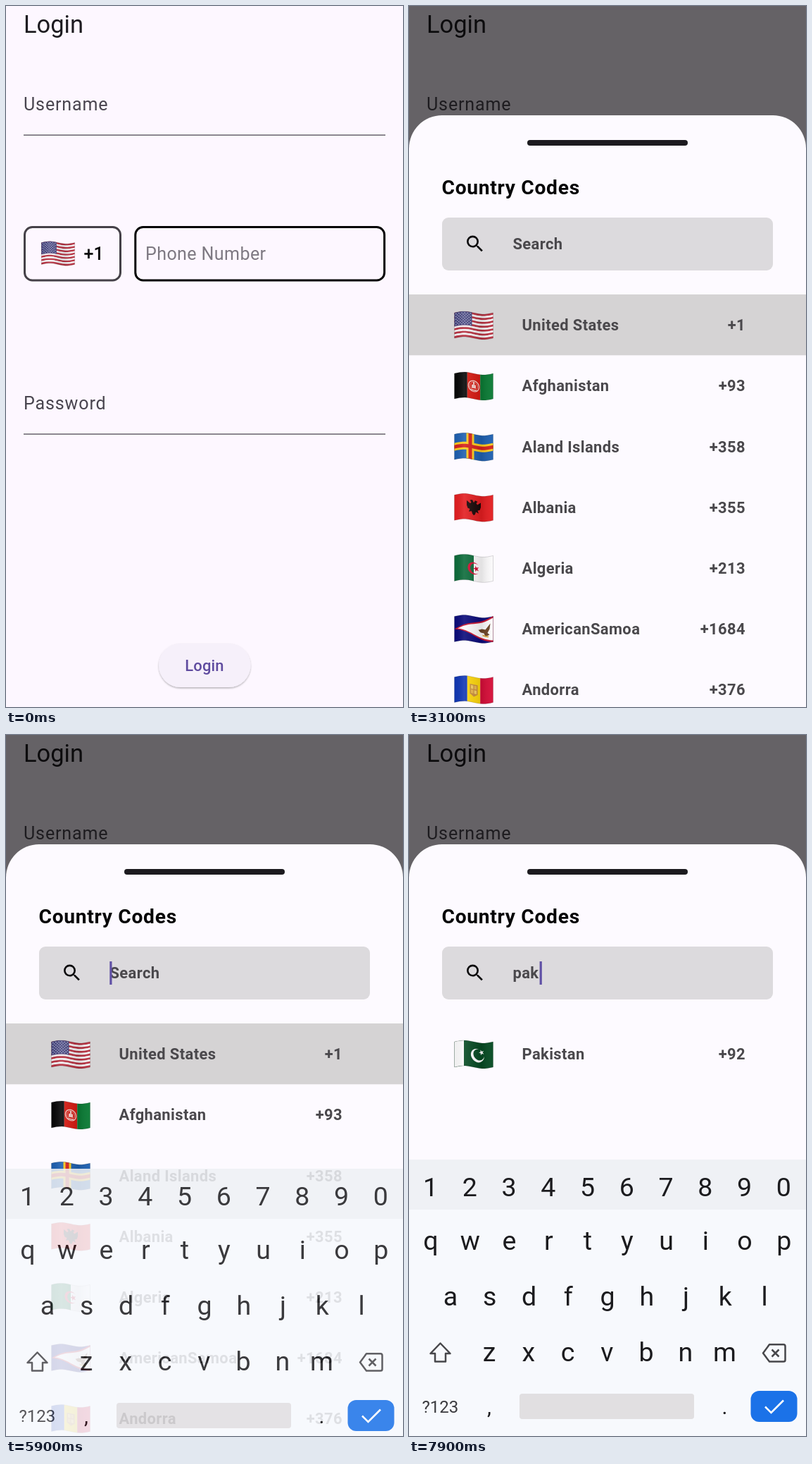
These frames come from a looping animation (564 px wide and 994 px high, 8 s). An HTML page:

```html
<!DOCTYPE html>
<html lang="en">
<head>
<meta charset="utf-8">
<title>Country code picker</title>
<style>
html, body { margin: 0; width: 100%; height: 100%; overflow: hidden; background: #fdf7ff; }
svg { display: block; width: 564px; height: 994px; }
text { font-family: Roboto, sans-serif; white-space: pre; }
.item { font-size: 21.93px; font-weight: 600; letter-spacing: .39px; fill: #4a484c; }
.field { font-size: 25.07px; letter-spacing: .85px; fill: #49454f; }
.key { font-size: 37.5px; text-anchor: middle; fill: #1b1b1e; }
</style>
</head>
<body>
<svg id="stage" viewBox="0 0 564 994" xmlns="http://www.w3.org/2000/svg"></svg>
<script>
const LOOP = 8000, STEP = 100, FLAG_W = 55, FLAG_H = 36, ROW = 86.1;
const TAU = Math.PI * 2;
const range = n => [...Array(n).keys()];

// ---- waving flags: flat polygons bent along a sine ----
const bend = (x, y) => `${x.toFixed(1)} ${(y - 2 * Math.sin(x / FLAG_W * TAU)).toFixed(2)}`;

function poly(color, pts, extra = '') {
  const d = pts.flatMap(([x, y], i) => {
    const [u, v] = pts[(i + 1) % pts.length];
    const n = Math.max(1, Math.ceil(Math.abs(u - x) / 4));
    return range(n).map(k => bend(x + (u - x) * k / n, y + (v - y) * k / n));
  });
  return `<path d="M${d.join('L')}Z" fill="${color}" ${extra}/>`;
}
const box = (c, x, y, w, h, extra) =>
  poly(c, [[x, y], [x + w, y], [x + w, y + h], [x, y + h]], extra);
const arc = (x, y, r, a, b, n) =>
  range(n + 1).map(i => a + (b - a) * i / n).map(t => [x + r * Math.cos(t), y + r * Math.sin(t)]);
const disc = (c, x, y, r) => poly(c, arc(x, y, r, 0, TAU, 20));
const ring = (c, x, y, r, w) => poly('none', arc(x, y, r, 0, TAU, 24), `stroke="${c}" stroke-width="${w}"`);
const star = (c, x, y, r, turn = -TAU / 4) => poly(c, range(10).map(i => {
  const q = i % 2 ? r * .4 : r, t = turn + i * TAU / 10;
  return [x + q * Math.cos(t), y + q * Math.sin(t)];
}));
function crescent(c, x, y, r, turn = 0) {
  const outer = arc(x, y, r, turn + .7, turn + TAU - .7, 20);
  const ix = x + .25 * r * Math.cos(turn), iy = y + .25 * r * Math.sin(turn);
  return poly(c, outer.concat(arc(ix, iy, r * .825, turn + TAU - .9, turn + .9, 20)));
}
const mirror = (c, cx, half) =>
  poly(c, [...half.map(([x, y]) => [cx + x, y]), ...half.slice().reverse().map(([x, y]) => [cx - x, y])]);
const columns = (...cs) => cs.map((c, i) => box(c, i * FLAG_W / cs.length, 0, FLAG_W / cs.length, FLAG_H)).join('');
const bands = (...cs) => cs.map((c, i) => box(c, 0, i * FLAG_H / cs.length, FLAG_W, FLAG_H / cs.length)).join('');
const field = c => bands(c);

const flags = {
  US: () => bands(...range(13).map(i => i % 2 ? '#f6f1f3' : '#b72f3f')) + box('#45457f', 0, 0, 25, 19.4) +
    range(9).map(r => range(r % 2 ? 5 : 6).map(i =>
      disc('#dcdcea', 2.3 + (r % 2 ? 2 : 0) + i * 4.1, 2 + r * 1.95, .65)).join('')).join(''),
  AF: () => columns('#060606', '#d6180f', '#0a7a34') + ring('#f3c9c4', 27.5, 18, 7.6, 1.3) +
    ring('#eeb4ae', 27.5, 18, 5.4, .7) + box('#f3c9c4', 24.5, 16, 6, 5) +
    box('#f3c9c4', 26.5, 12, 2, 4) + box('#f3c9c4', 22.5, 23, 10, 1.2),
  AX: () => field('#1d5fb0') + box('#fccb1c', 17, 0, 11, FLAG_H) + box('#fccb1c', 0, 12.5, FLAG_W, 11) +
    box('#d5201c', 20, 0, 5, FLAG_H) + box('#d5201c', 0, 15.5, FLAG_W, 5),
  AL: () => field('#e31d20') + mirror('#170606', 27.5, [[0, 11], [2, 7.5], [5.5, 8.5], [3.5, 11], [5, 13],
    [10, 9.5], [10, 16], [8.5, 20], [5.5, 21], [7, 25], [3, 23.5], [2, 27], [0, 29]]),
  DZ: () => columns('#0c6b3a', '#fbfafb') + crescent('#d21034', 27.5, 18, 8.6) + star('#d21034', 31, 18, 4.4, Math.PI),
  AS: () => field('#0a0a7a') + poly('#c4122f', [[0, 18], [55, -.5], [55, 36.5]]) +
    poly('#fbfafb', [[4.5, 18], [55, 2], [55, 34]]) +
    poly('#6b4426', [[34, 18], [39, 16], [44, 17], [51, 9], [50, 17], [47, 22], [50, 25], [44, 27], [42, 22], [37, 21]]) +
    poly('#d8a63a', [[40, 24], [49, 27], [48, 28.5], [40, 26]]),
  AD: () => columns('#1036b4', '#fcd50a', '#d50d38') + box('#c88b3c', 22, 10.5, 11, 14) +
    poly('#c88b3c', [[22, 24], [33, 24], [27.5, 28]]) + box('#f2cb62', 23.5, 12, 3.4, 5) +
    box('#e8b44c', 28.1, 12, 3.4, 5) + box('#f2cb62', 28.1, 18.4, 3.4, 5) + box('#e8b44c', 23.5, 18.4, 3.4, 5),
  BO: () => bands('#d8271c', '#f9e40a', '#0b7a33'),
  CV: () => field('#0b3a9a') + box('#fbfafb', 0, 18, FLAG_W, 9) + box('#d01f2a', 0, 21, FLAG_W, 3) +
    range(10).map(i => star('#f5d01c', 20 + 8.5 * Math.sin(i * TAU / 10), 22.5 - 8.5 * Math.cos(i * TAU / 10), 1.8)).join(''),
  JP: () => field('#fbfafb') + disc('#bc002d', 27.5, 18, 9.5),
  NP: () => poly('#c4163c', [[6, 0], [38, 19], [18, 19], [38, 36], [6, 36]], 'stroke="#10368c" stroke-width="2"') +
    disc('#fff', 14, 12, 3) + disc('#fff', 15, 27, 4),
  PK: () => field('#054a22') + box('#fbfafb', 0, 0, 13.5, FLAG_H) +
    crescent('#fff', 33, 18.5, 9.6, -.7) + star('#fff', 38.5, 13.5, 4, -.7)
};

const flag = (id, x, y, scale = 1) => `<g transform="translate(${x} ${y}) scale(${scale})">${flags[id]()}` +
  (id === 'NP' ? '' : box('url(#sheen)', 0, 0, FLAG_W, FLAG_H, 'stroke="#000" stroke-opacity=".18" stroke-width=".8"')) + '</g>';

// ---- screen parts ----
const text = (s, x, y, attrs = '') => `<text x="${x}" y="${y}" ${attrs}>${s}</text>`;
const rect = (x, y, w, h, r, fill, attrs = '') =>
  `<rect x="${x}" y="${y}" width="${w}" height="${h}" rx="${r}" fill="${fill}" ${attrs}/>`;

const login = rect(0, 0, 564, 994, 0, '#fdf7ff') +
  text('Login', 25, 38, 'font-size="34.47" fill="#1d1b20"') +
  text('Username', 25, 147.5, 'class="field"') + rect(25, 182.3, 514, 1.5, 0, '#69646d') +
  text('Password', 25, 571.5, 'class="field"') + rect(25, 606.3, 514, 1.5, 0, '#69646d') +
  rect(26.5, 313.5, 136, 75.5, 11, 'none', 'stroke="#454148" stroke-width="3"') +
  rect(183.8, 313.5, 353.8, 75.5, 11, 'none', 'stroke="#000" stroke-width="3"') +
  flag('US', 50.3, 335.5, .86) +
  text('+1', 110.5, 360.3, 'font-size="25" font-weight="500" fill="#0b0a0c"') +
  text('Phone Number', 198, 359.8, 'font-size="25.07" letter-spacing=".39" fill="#7e7982"') +
  rect(217, 904, 130.5, 62, 31, '#f6f0fa', 'filter="url(#lift)"') +
  text('Login', 282, 942.7, 'font-size="21.93" font-weight="500" letter-spacing=".16" text-anchor="middle" fill="#5f4b9f"');

const sheet = rect(0, 0, 564, 994, 0, '#000', 'opacity=".6"') +
  '<path d="M0 994V202A47 47 0 0 1 47 155H517A47 47 0 0 1 564 202V994Z" fill="#fdfaff"/>' +
  rect(168, 190, 228, 8, 4, '#1c1a1f') +
  text('Country Codes', 46.5, 266.7, 'font-size="28.2" font-weight="700" letter-spacing=".7" fill="#050506"') +
  rect(47, 300, 470, 75, 9, '#dcdadd') +
  '<path transform="translate(78.1 321.6) scale(1.306)" fill="#0b0a0c" d="M15.5 14h-.79l-.28-.27A6.47 6.47 0 0 0 16 9.5 6.5 6.5 0 1 0 9.5 16c1.61 0 3.09-.59 4.23-1.57l.27.28v.79l5 4.99L20.49 19zM9.5 14A4.5 4.5 0 1 1 9.5 5a4.5 4.5 0 0 1 0 9z"/>';

const row = ([id, name, code], i) => flag(id, 64.5, 435 + i * ROW) +
  text(name, 160.5, 460.3 + i * ROW, 'class="item"') +
  text(code, 478, 460.3 + i * ROW, 'class="item" text-anchor="end"');

const lists = {
  '': [['US', 'United States', '+1'], ['AF', 'Afghanistan', '+93'], ['AX', 'Aland Islands', '+358'],
    ['AL', 'Albania', '+355'], ['DZ', 'Algeria', '+213'], ['AS', 'AmericanSamoa', '+1684'], ['AD', 'Andorra', '+376']],
  p: [['BO', 'Bolivia, Plurinational St...', '+591'], ['CV', 'Cape Verde', '+238']],
  pa: [['JP', 'Japan', '+81'], ['NP', 'Nepal', '+977']],
  pak: [['PK', 'Pakistan', '+92']]
};
const listGroups = Object.entries(lists).map(([q, rows]) => `<g data-query="${q}">` +
  (q ? '' : rect(0, 409, 564, 86.3, 0, '#d5d3d4')) + rows.map(row).join('') + '</g>').join('');

const keys = (chars, x, y) => [...chars].map((c, i) => text(c, x + i * 55.75, y, 'class="key"')).join('');
const keyboard = rect(0, 602, 564, 71, 0, '#eff1f5') + rect(0, 673, 564, 340, 0, '#f7f9fd') +
  keys('1234567890', 30.5, 653.5) + keys('qwertyuiop', 31, 729.8) +
  keys('asdfghjkl', 59, 809) + keys('zxcvbnm', 114, 888) +
  `<g fill="none" stroke="#47474b" stroke-width="2.5" stroke-linejoin="round">
    <path d="M44.5 862.5L58.5 877H52V888.5H37V877H30.5Z"/>
    <path d="M512 864.3H532Q534.5 864.3 534.5 867V886Q534.5 888.6 532 888.6H512L503 876.5ZM515.5 871.5L525.5 881.5M525.5 871.5L515.5 881.5"/>
  </g>` +
  text('?123', 18.5, 960.5, 'font-size="24" fill="#3c3c40"') +
  text(',', 114, 963, 'class="key" style="font-size:30px"') +
  text('.', 448.5, 963, 'class="key" style="font-size:30px"') +
  rect(157, 934, 248, 36, 4, '#e1dfe1') + rect(485.5, 930, 66, 44, 12, '#1b72e8') +
  '<path d="M506 952.5L514.5 961L532 943.5" fill="none" stroke="#fff" stroke-width="2.6"/>';

const stage = document.getElementById('stage');
stage.innerHTML = `<defs>
  <linearGradient id="sheen"><stop offset="0" stop-color="#000" stop-opacity=".04"/>
    <stop offset=".25" stop-color="#fff" stop-opacity=".1"/><stop offset=".7" stop-color="#000" stop-opacity=".1"/>
    <stop offset="1" stop-color="#fff" stop-opacity=".04"/></linearGradient>
  <filter id="lift" x="-10%" y="-20%" width="120%" height="150%">
    <feDropShadow dx="0" dy="1.4" stdDeviation="1.2" flood-color="#000" flood-opacity=".3"/></filter>
  </defs>${login}
  <g id="sheet">${sheet}${text('Search', 147.5, 344.5, 'class="item" id="hint"')}
    ${text('', 147.5, 344.5, 'class="item" id="typed"')}
    ${rect(147.3, 321, 3.2, 33, 0, '#6050a6', 'id="caret"')}
    ${listGroups}<g id="keyboard">${keyboard}</g></g>`;

// ---- timeline ----
const $ = id => document.getElementById(id);
const show = (el, on) => el.setAttribute('visibility', on ? 'inherit' : 'hidden');
const groups = [...stage.querySelectorAll('[data-query]')];

const typing = [[0, '', 147.3], [7000, 'p', 160.4], [7200, 'pa', 172.8], [7500, 'pak', 185.6]];
const caretBlinks = [[0, false], [5400, true], [6200, false], [6700, true]];
const keyboardMoves = [[5750, 60, 0], [5900, 13, .86], [6000, 0, 1]]; // time, drop, opacity

const latest = (table, t) => table.filter(k => k[0] <= t).pop();
function tween(table, t) {
  const i = table.findIndex(k => k[0] > t);
  if (i === 0) return table[0];
  if (i < 0) return table[table.length - 1];
  const a = table[i - 1], b = table[i], f = (t - a[0]) / (b[0] - a[0]);
  return a.map((v, k) => v + (b[k] - v) * f);
}

function draw(t) {
  show($('sheet'), t >= 3100);
  const [, query, caretX] = latest(typing, t);
  groups.forEach(g => show(g, g.dataset.query === query));
  $('typed').textContent = query;
  show($('hint'), t < 7100);
  show($('caret'), latest(caretBlinks, t)[1]);
  $('caret').setAttribute('x', caretX);
  const [, drop, opacity] = tween(keyboardMoves, t);
  $('keyboard').setAttribute('transform', `translate(0 ${drop})`);
  $('keyboard').setAttribute('opacity', opacity);
}

const start = performance.now();
function tick() {
  const t = (performance.now() - start) % LOOP;
  draw(Math.floor(t / STEP) * STEP);
  requestAnimationFrame(tick);
}
tick();
</script>
</body>
</html>
```
